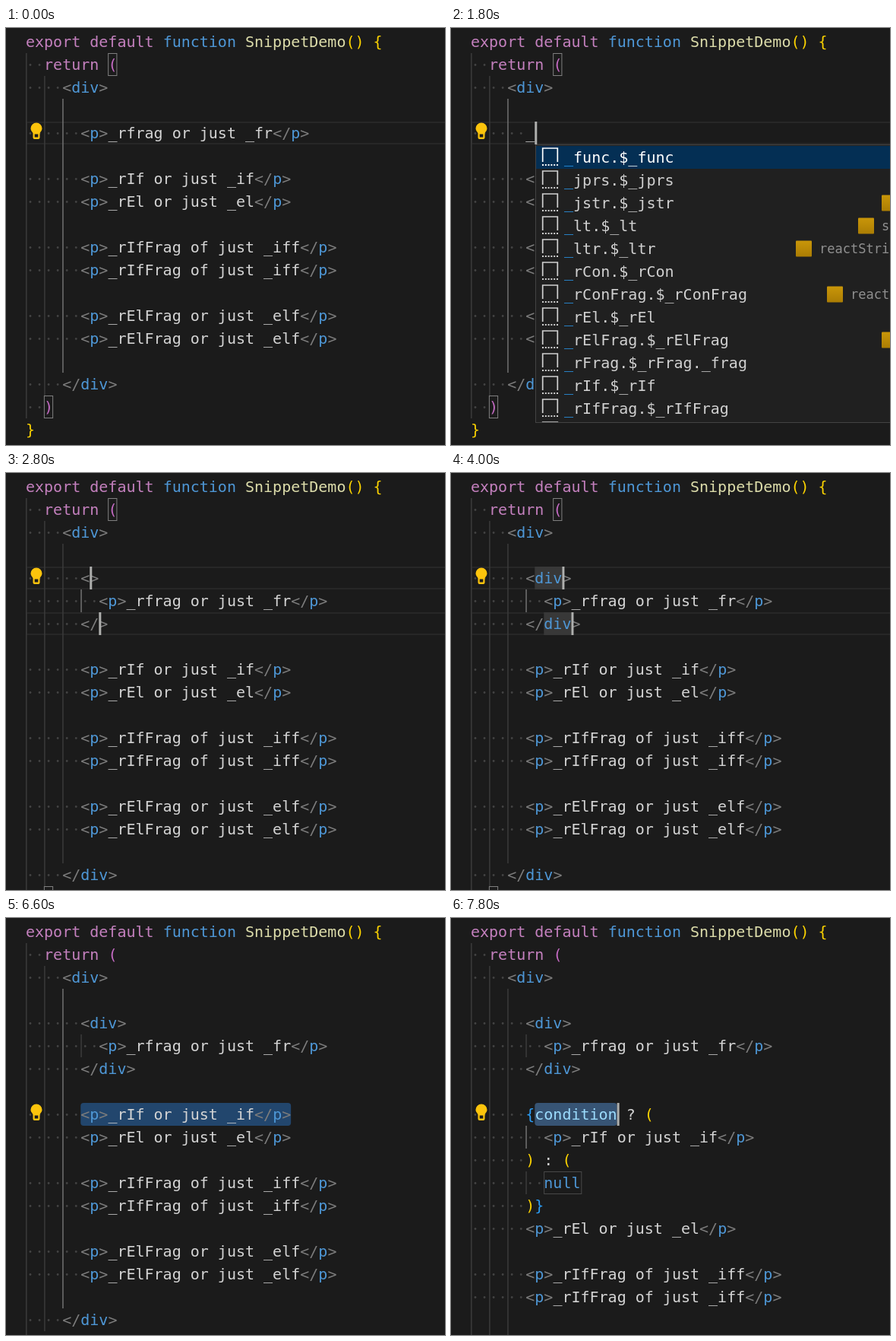
Write an HTML page that moves like this. It is 578 px wide and 548 px high and loops after 8 s.

```html
<!DOCTYPE html>
<html lang="en">
<head>
<meta charset="utf-8">
<title>Snippet demo</title>
<style>
  html, body { margin: 0; width: 100%; height: 100%; overflow: hidden; background: #1b1b1b; }
  svg { display: block; }
  text { font: 20px "DejaVu Sans Mono", monospace; white-space: pre; }
</style>
</head>
<body>
<svg id="stage" width="578" height="548" viewBox="0 0 578 548"></svg>
<script>
const LOOP = 8000, STEP = 200;
const CW = 12.04, LH = 30, LEFT = 26, TOP = 3;
const C = {
  key: '#c480be', blue: '#4e97d6', name: '#dcdcaa', gold: '#fcd300', orchid: '#c56bc4',
  gray: '#7c7c7c', text: '#d4d4d4', brace: '#2b9df5', prop: '#9cdcfe', match: '#2a9df4'
};
const stage = document.getElementById('stage');

const colX = c => LEFT + c * CW;
const rowY = r => TOP + r * LH;
const esc = s => s.replace(/&/g, '&amp;').replace(/</g, '&lt;');
const span = (color, s) => `<tspan fill="${color}">${esc(s)}</tspan>`;
const rect = (x, y, w, h, attrs) => `<rect x="${x}" y="${y}" width="${w}" height="${h}" ${attrs}/>`;

// A line of code: its indent and coloured runs
const line = (indent, ...runs) => ({ indent, runs });
const blank = null;
const open = s => [['gray', '<'], ['blue', s], ['gray', '>']];
const close = s => [['gray', '</'], ['blue', s], ['gray', '>']];
const para = (indent, s) => line(indent, ...open('p'), ['text', s], ...close('p'));
const typed = s => line(6, ['text', s]);

// Value of the last [time, value] pair that has begun
const at = (t, pairs) => pairs.reduce((v, p) => t >= p[0] ? p[1] : v, undefined);

function buildLines(s) {
  const first = para(6, '_rfrag or just _fr');
  const second = para(6, '_rIf or just _if');
  const top = s.wrapped
    ? [line(6, ...open(s.tag)), para(8, '_rfrag or just _fr'), line(6, ...close(s.tag))]
    : [s.input && s.row === 4 ? typed(s.input) : first];
  const cond = s.cond
    ? [line(6, ['brace', '{'], ['prop', 'condition'], ['text', ' ? '], ['gold', '(']),
       para(8, '_rIf or just _if'),
       line(6, ['gold', ')'], ['text', ' : '], ['gold', '(']),
       line(8, ['blue', 'null']),
       line(6, ['gold', ')'], ['brace', '}'])]
    : [s.input && s.row === 8 ? typed(s.input) : second];
  const pair = text => [para(6, text), para(6, text)];
  return [
    line(0, ['key', 'export default '], ['blue', 'function '], ['name', 'SnippetDemo'], ['gold', '() {']),
    line(2, ['key', 'return '], ['orchid', '(']),
    line(4, ...open('div')),
    blank, ...top,
    blank, ...cond, para(6, '_rEl or just _el'),
    blank, ...pair('_rIfFrag of just _iff'),
    blank, ...pair('_rElFrag or just _elf'),
    blank, line(4, ...close('div')),
    line(2, ['orchid', ')']),
    line(0, ['gold', '}'])
  ];
}

function stateAt(t) {
  const s = {
    wrapped: t >= 2600,
    cond: t >= 7600,
    tag: at(t, [[0, ''], [3200, 'd'], [3400, 'di'], [3600, 'div']]),
    input: at(t, [[0, ''], [1800, '_'], [2200, '_f'], [2400, '_fr'], [2600, ''],
                  [7000, '_'], [7200, '_i'], [7400, '_if'], [7600, '']]),
    row: at(t, [[0, 4], [4600, 5], [4800, 6], [5000, 7], [5200, 8]]),
    bulb: t < 5400 ? 4 : 8,
    words: t >= 3800 && t < 4600,
    select: at(t, [[0, null], [1000, [6, 31]], [1800, null], [5800, [6, 29]], [7000, null], [7600, [7, 16]]])
  };
  const n = s.tag.length;
  s.carets = s.input ? [[s.row, 6 + s.input.length]]
    : s.cond ? [[8, 16]]
    : s.select || t < 600 ? []
    : t < 1000 ? [[4, 6]]
    : t < 4400 ? [[4, 7 + n], [6, 8 + n]]
    : [[s.row, s.row === 7 ? 0 : t >= 5600 ? 6 : 10]];
  s.active = s.cond ? [6, 9, 9] : !s.wrapped ? [4, 3, 14] : s.row < 7 ? [6, 5, 5] : [4, 3, 16];
  return s;
}

function drawGuides(lines, active) {
  const depth = lines.map((l, i) => l ? l.indent : Math.max(lines[i - 1].indent, lines[i + 1].indent));
  let out = '';
  depth.forEach((d, r) => {
    for (let c = 0; c < d; c += 2) {
      const lit = c === active[0] && r >= active[1] && r <= active[2];
      out += rect(colX(c), rowY(r), 1.6, LH, `fill="${lit ? '#6c6c6c' : '#393939'}"`);
    }
  });
  return out;
}

function drawLine(l, r) {
  if (!l) return '';
  let out = '';
  for (let c = 0; c < l.indent; c++)
    out += `<circle cx="${colX(c + 0.5)}" cy="${rowY(r) + 15.5}" r="1.4" fill="#434343"/>`;
  return out + `<text x="${colX(l.indent)}" y="${rowY(r) + 22}">` +
    l.runs.map(([k, s]) => span(C[k], s)).join('') + '</text>';
}

function drawBulb(r) {
  const y = rowY(r);
  return `<path d="M40 ${y + 1.5}a7.5 7.5 0 0 1 7.5 7.5c0 3-2.5 4.500-3 6.500v5.500q0 2-2 2h-5q-2 0-2-2v-5.500c-.5-2-3-3.500-3-6.500a7.500 7.500 0 0 1 7.500-7.500z" fill="#fcc40c"/>` +
    rect(37.7, y + 16.5, 4.6, 4, 'fill="#1b1b1b"');
}

const box = (c, r, n, color) =>
  rect(colX(c) + 0.3, rowY(r) + 0.5, n * CW - 0.8, LH - 1, `fill="none" stroke="${color}"`);

// Completion entries: label, x of the side mark, side text
const ITEMS = [
  ['_func.$_func'], ['_jprs.$_jprs'], ['_jstr.$_jstr', 567], ['_lt.$_lt', 536, 's'],
  ['_ltr.$_ltr', 454, 'reactStri'], ['_rCon.$_rCon'], ['_rConFrag.$_rConFrag', 495, 'react'],
  ['_rEl.$_rEl'], ['_rElFrag.$_rElFrag', 567], ['_rFrag.$_rFrag._frag'],
  ['_rIf.$_rIf'], ['_rIfFrag.$_rIfFrag'], ['_try.$_try']
];

// Positions of the typed letters in a label, or null
function matches(label, input) {
  const low = label.toLowerCase(), word = low.split('.')[0], hits = [];
  for (const ch of input) {
    const i = word.indexOf(ch, hits.length ? hits[hits.length - 1] + 1 : 0);
    if (i < 0) return null;
    hits.push(i);
  }
  return hits;
}

function drawItem([label, markX, side], i, input) {
  const y = 2 + i * LH, hits = matches(label, input);
  let out = i ? '' : rect(1, y, 480, LH, 'fill="#042f54"');
  const ink = i ? '#d0d0d0' : '#ffffff';
  out += `<path d="M9.700 ${y + 21}v-18h19.600v18" fill="none" stroke="${ink}" stroke-width="1.7"/>` +
    `<path d="M9 ${y + 25}h21" stroke="${ink}" stroke-width="1.8" stroke-dasharray="2 1.800"/>`;
  out += `<text x="38" y="${y + 22}">` +
    [...label].map((ch, k) => span(hits.includes(k) ? C.match : ink, ch)).join('') + '</text>';
  if (markX) out += rect(markX - 111, y + 4.500, 21, 21, 'rx="1" fill="url(#mark)"');
  if (side) out += `<text x="${markX - 80}" y="${y + 21}" style="font-size:17px" fill="#8f8f8f">${side}</text>`;
  return out;
}

function drawPopup(row, input) {
  const rank = item => item[0].toLowerCase().includes(input) ? 0 : 1;
  const list = ITEMS.filter(item => matches(item[0], input)).sort((a, b) => rank(a) - rank(b));
  const h = Math.min(366, list.length * LH + 4);
  return `<svg x="111" y="${rowY(row + 1)}" width="467" height="${h}" overflow="hidden">` +
    rect(0.5, 0.5, 480, h - 1, 'fill="#202020" stroke="#434343"') +
    list.map((item, i) => drawItem(item, i, input)).join('') +
    rect(0.5, 0.5, 480, h - 1, 'fill="none" stroke="#434343"') + '</svg>';
}

function draw(t) {
  const s = stateAt(t), lines = buildLines(s);
  let out = '<defs><linearGradient id="mark" x2="0" y2="1"><stop stop-color="#c99609"/>' +
    '<stop offset="1" stop-color="#ab7d04"/></linearGradient></defs>' +
    rect(0, 0, 578, 548, 'fill="#1b1b1b"');

  if (!s.select) {
    const rows = s.carets.length ? s.carets.map(c => c[0]) : [s.row];
    for (const r of rows) out += rect(27, rowY(r) + 1, 600, LH - 2, 'fill="none" stroke="#272727" stroke-width="2"');
  } else {
    const [a, b] = s.select;
    out += rect(colX(a), rowY(s.row), (b - a) * CW, LH, `rx="4" fill="${s.cond ? '#375474' : '#22466d'}"`);
  }
  if (s.words)
    for (const [r, c] of [[4, 7], [6, 8]]) out += rect(colX(c), rowY(r), 3 * CW, LH, 'fill="#383838"');

  out += drawGuides(lines, s.active) + lines.map(drawLine).join('');
  if (!s.select) out += box(9, 1, 1, '#808080') + box(2, lines.length - 2, 1, '#808080');
  if (s.cond) out += box(8, 11, 4.15, '#484848');
  out += drawBulb(s.bulb);
  for (const [r, c] of s.carets) out += rect(colX(c), rowY(r), 3, LH, 'fill="#aeafad"');
  if (s.input) out += drawPopup(s.row, s.input);
  stage.innerHTML = out;
}

let last = -1;
function tick() {
  const t = Math.floor(performance.now() % LOOP / STEP) * STEP;
  if (t !== last) draw(last = t);
  requestAnimationFrame(tick);
}
tick();
</script>
</body>
</html>
```
